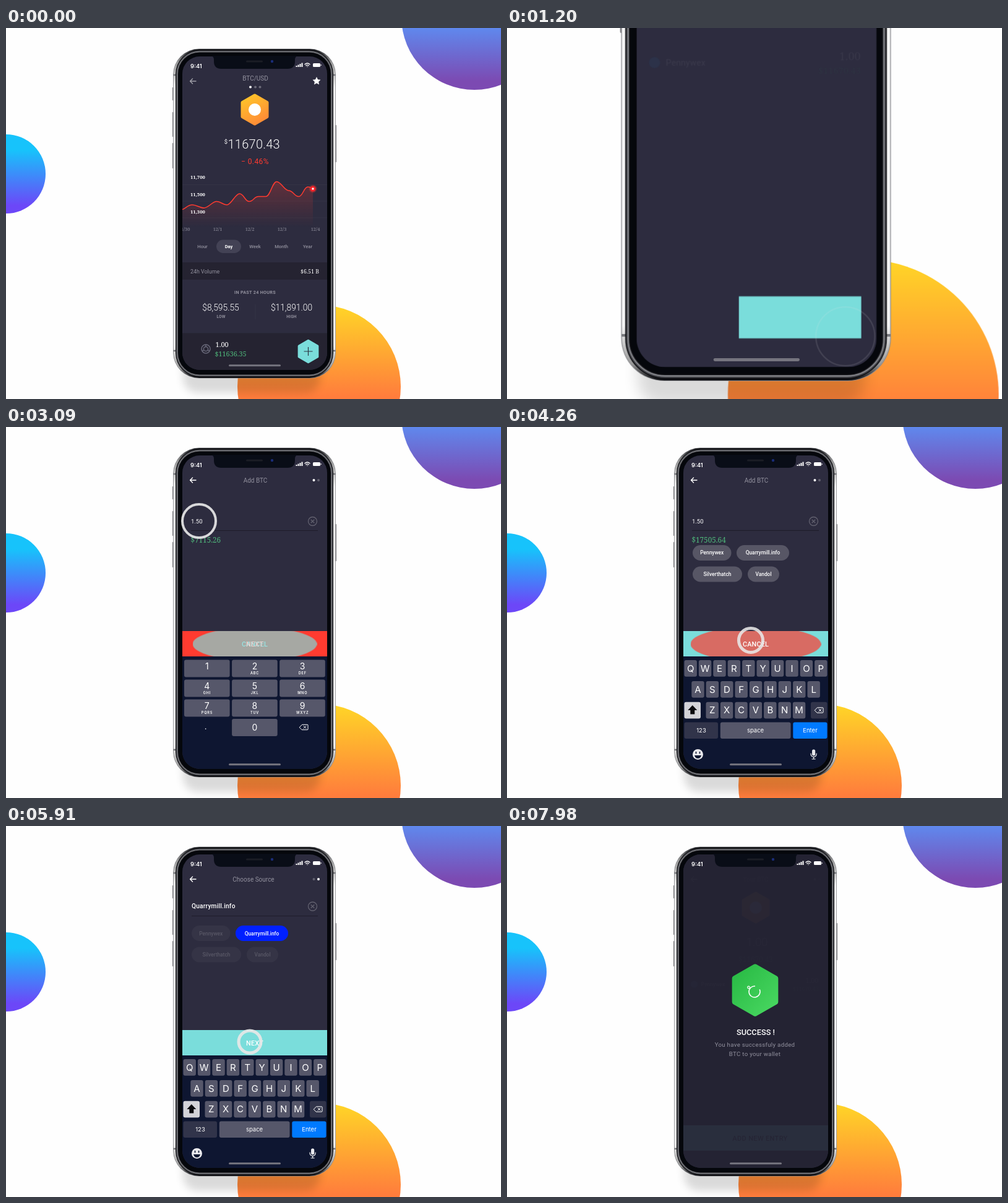
An HTML page that plays this animation: 800 px wide and 600 px high, repeating every 8 s.

```html
<!DOCTYPE html>
<html lang="en">
<head>
<meta charset="utf-8">
<title>Wallet app</title>
<style>
html, body { margin: 0; width: 100%; height: 100%; overflow: hidden; background: #fefefe; }
svg { display: block; width: 100%; height: 100%; }
text { font-family: Roboto, sans-serif; fill: #fff; }
.slab { font-family: "Noto Serif", serif; }
.mid { text-anchor: middle; }
.end { text-anchor: end; }
.thin { font-weight: 300; }
.med { font-weight: 500; }
.bold { font-weight: 700; }
.dim { fill: #92919e; }
.green { fill: #4fb97b; }
.key { font-family: Inter, sans-serif; text-anchor: middle; }
.line { fill: none; stroke: #fff; stroke-width: 1.4; stroke-linecap: round; stroke-linejoin: round; }

.a { animation: 8s ease-in-out infinite both; }
#camera { transform-origin: 400px 560px; animation-name: camera; animation-timing-function: cubic-bezier(.5, 0, .2, 1); }
#home { animation-name: home; }
#plus { animation-name: plus; }
#coin { animation-name: coin; }
#wallet { animation-name: wallet; }
#add { animation-name: add; }
#src { animation-name: src; }
#head { animation-name: head; }
#field { animation-name: field; }
#chips { animation-name: chips; }
#picked { animation-name: picked; }
.off { animation-name: off; }
.on { animation-name: on; }
#bar { transform-origin: 488.5px 351px; animation-name: bar; }
#fill { animation-name: fill; }
#pulse { transform-origin: 402px 351px; animation-name: pulse; animation-timing-function: linear; }
#lblAdd { animation-name: lblAdd; }
#lblCancel { animation-name: lblCancel; }
#lblNext { animation-name: lblNext; }
#keys { animation-name: keys; }
#qwerty { animation-name: qwerty; }
#veil { animation-name: veil; }
#badge { transform-origin: 401px 265.5px; animation-name: badge; }
#done { animation-name: done; }
#spin { stroke-dasharray: 100 110; animation-name: spin; }
#dot { animation-name: dot; }
.tap { fill: none; stroke: #e8e8e8; animation-name: tap; }

@keyframes camera { 0%, 1.875% { transform: scale(1) } 10%, 11.75% { transform: scale(1.975) } 21.69%, 100% { transform: scale(1) } }
@keyframes home { 0%, 12% { opacity: 1 } 15%, 100% { opacity: 0 } }
@keyframes plus { 0%, 12.5% { opacity: 1 } 13.2%, 100% { opacity: 0 } }
@keyframes coin { 0%, 23.5% { opacity: 1 } 26.3%, 75.6% { opacity: 0 } 78.8%, 100% { opacity: .45 } }
@keyframes wallet { 0%, 14.4% { opacity: 0 } 18%, 23.5% { opacity: 1 } 26.3%, 75.6% { opacity: 0 } 78.8%, 100% { opacity: .25 } }
@keyframes add { 0%, 24.5% { opacity: 0; transform: translateY(30px) } 29%, 53.6% { opacity: 1; transform: none } 56.2%, 100% { opacity: 0; transform: none } }
@keyframes src { 0%, 50.8% { opacity: 0 } 52.8%, 74.4% { opacity: 1 } 76.9%, 100% { opacity: 0 } }
@keyframes head { 0%, 53.6% { opacity: 0 } 56.2%, 100% { opacity: 1 } }
@keyframes field { 0%, 52.4% { opacity: 0; transform: translateY(22px) } 57.5%, 100% { opacity: 1; transform: none } }
@keyframes chips { 0%, 50.8% { transform: translateY(52px) } 53.25% { transform: translateY(30px) } 57.5%, 100% { transform: none } }
@keyframes picked { 0%, 61.9% { opacity: 0 } 65%, 100% { opacity: 1 } }
@keyframes off { 0%, 61.9% { opacity: 1 } 64.5%, 100% { opacity: .2 } }
@keyframes on { 0%, 61.9% { fill: #575665 } 64.5%, 100% { fill: #0020ff } }
@keyframes bar {
  0%, 12.5% { opacity: 0; transform: translateY(154px) scaleX(.14) }
  12.9% { opacity: 1; transform: translateY(154px) scaleX(.14) }
  17.5%, 23.5% { opacity: 1; transform: translateY(154px) scaleX(1) }
  30%, 74.6% { opacity: 1; transform: translateY(0) scaleX(1) }
  79.4%, 100% { opacity: 1; transform: translateY(154px) scaleX(1) }
}
@keyframes fill {
  0%, 23.5% { fill: #7adddb } 28.75%, 39.86% { fill: #ff3b30 } 39.875%, 54.36% { fill: #7adddb }
  54.375%, 65.61% { fill: #ff3b30 } 65.625%, 100% { fill: #7adddb }
}
@keyframes pulse {
  0%, 36.125% { transform: scale(0); fill: #ff3b30 } 39.875% { transform: scale(1); fill: #7adddb }
  39.9%, 50.625% { transform: scale(0); fill: #7adddb } 54.375% { transform: scale(1); fill: #ff3b30 }
  54.4%, 61.875% { transform: scale(0); fill: #ff3b30 } 65.625% { transform: scale(1); fill: #7adddb }
  65.65%, 100% { transform: scale(0); fill: #7adddb }
}
@keyframes lblAdd { 0%, 16.2% { opacity: 0 } 18.1%, 23.5% { opacity: 1 } 25.6%, 76.9% { opacity: 0 } 79.4%, 100% { opacity: 1 } }
@keyframes lblCancel {
  0%, 26.9% { opacity: 0; fill: #fff } 29.4%, 36.1% { opacity: 1; fill: #fff }
  39.86% { opacity: 1; fill: #7adddb } 39.9%, 50.6% { opacity: 0; fill: #fff }
  53%, 61.9% { opacity: 1; fill: #fff } 65.6%, 100% { opacity: 0; fill: #fff }
}
@keyframes lblNext {
  0%, 36.1% { opacity: 0; fill: #ff3b30 } 39.875%, 50.6% { opacity: 1; fill: #fff }
  52.6%, 61.9% { opacity: 0; fill: #fff } 65.6%, 74.6% { opacity: 1; fill: #fff } 76.3%, 100% { opacity: 0; fill: #fff }
}
@keyframes keys { 0%, 23.5% { transform: translateY(184px) } 30%, 74.6% { transform: none } 79.4%, 100% { transform: translateY(184px) } }
@keyframes qwerty { 0%, 50.3% { opacity: 0 } 52.5%, 100% { opacity: 1 } }
@keyframes veil { 0%, 75% { opacity: 0 } 80.4%, 100% { opacity: .94 } }
@keyframes badge { 0%, 80.6% { transform: scale(0) } 84.2% { transform: scale(1.03) } 86%, 100% { transform: scale(1) } }
@keyframes done { 0%, 83.5% { opacity: 0; transform: translateY(4px) } 89.5%, 100% { opacity: 1; transform: none } }
@keyframes spin { 0%, 91.1% { stroke-dashoffset: 105 } 99.75%, 100% { stroke-dashoffset: 0 } }
@keyframes dot { 0%, 91% { opacity: 0 } 92.5%, 100% { opacity: 1 } }
@keyframes tap {
  0% { r: 31px; stroke-width: 1px; opacity: 0 }
  .4% { r: 30px; stroke-width: 1px; opacity: .35 }
  3% { r: var(--r, 18px); stroke-width: var(--w, 5px); opacity: .92 }
  4.5% { r: calc(var(--r, 18px) + 1.5px); stroke-width: var(--w, 5px); opacity: .88 }
  7.5%, 100% { r: 30px; stroke-width: 1px; opacity: 0 }
}
</style>
</head>
<body>
<svg viewBox="0 0 800 600" preserveAspectRatio="none">
<defs>
  <linearGradient id="blue" x2="0" y2="1"><stop offset=".56" stop-color="#5e8bf0"/><stop offset=".94" stop-color="#7c4ab2"/></linearGradient>
  <linearGradient id="cyan" x2="0" y2="1"><stop offset=".2" stop-color="#17c3fb"/><stop offset=".9" stop-color="#6c47f8"/></linearGradient>
  <linearGradient id="orange" x2="0" y2="1"><stop stop-color="#ffd627"/><stop offset=".56" stop-color="#ff7d3c"/></linearGradient>
  <linearGradient id="gold" x2=".5" y2="1"><stop stop-color="#ffc928"/><stop offset="1" stop-color="#ff8f36"/></linearGradient>
  <linearGradient id="leaf" x2="1" y2="1"><stop stop-color="#28b944"/><stop offset="1" stop-color="#49d861"/></linearGradient>
  <linearGradient id="steel" x2="0" y2="1"><stop stop-color="#15161a"/><stop offset=".04" stop-color="#999"/><stop offset=".12" stop-color="#f6f6f6"/><stop offset=".9" stop-color="#f6f6f6"/><stop offset=".97" stop-color="#999"/><stop offset="1" stop-color="#08090d"/></linearGradient>
  <linearGradient id="area" x2="0" y2="1"><stop stop-color="#ff3b30" stop-opacity=".25"/><stop offset="1" stop-color="#ff3b30" stop-opacity="0"/></linearGradient>
  <filter id="soft" x="-20%" y="-50%" width="140%" height="200%"><feGaussianBlur stdDeviation="7"/></filter>
  <clipPath id="screen"><rect x="285" y="46" width="234" height="507" rx="28"/></clipPath>
  <clipPath id="barBox"><rect x="285" y="330" width="234" height="41"/></clipPath>
  <path id="hex" d="M0-23L20-11.5V11.5L0 23L-20 11.5V-11.5Z" stroke-width="5" stroke-linejoin="round"/>
  <path id="back" class="line" d="M307 86H297.5M301.5 82l-4 4 4 4"/>
  <g id="pages"><circle cx="497.5" cy="86" r="2" fill="#fff"/><circle cx="505" cy="86" r="2" fill="#62616f"/></g>
  <g id="clear" fill="none" stroke="#62616f" stroke-width="1.3"><circle r="7"/><path d="M-2.8-2.8L2.8 2.8M2.8-2.8L-2.8 2.8"/></g>
  <path id="erase" class="line" style="stroke-width:1" d="M-6.5 0l4-4.2h8.5q1 0 1 1v6.4q0 1-1 1h-8.5zM0-2l4 4M4-2l-4 4"/>
</defs>

<rect width="800" height="600" fill="#fefefe"/>
<g id="camera" class="a">
  <circle cx="757" cy="-18" r="118" fill="url(#blue)"/>
  <circle cy="236" r="64" fill="url(#cyan)"/>
  <circle cx="506" cy="580" r="132" fill="url(#orange)"/>
  <rect x="286" y="520" width="222" height="70" rx="24" opacity=".14" filter="url(#soft)"/>

  <path d="M270.3 97v19M270.3 137v38M270.3 187v39M532.7 158v58" stroke="#77777b" stroke-width="2.6" stroke-linecap="round"/>
  <rect x="270" y="33.5" width="263" height="533" rx="42" fill="#8a8b8f"/>
  <rect x="270.8" y="34" width="261.4" height="532" rx="41.5" fill="url(#steel)"/>
  <path d="M270.5 76h4M270.5 522h4M528.5 76h4M528.5 522h4" stroke="#77787c" stroke-width="2.5"/>
  <rect x="274" y="35.5" width="255" height="529" rx="39" fill="#08090d"/>
  <rect x="276.5" y="38" width="250" height="524" rx="36.5" fill="none" stroke="#45464b" stroke-width="3"/>
  <rect x="276.8" y="38.3" width="249.400" height="523.4" rx="36" fill="none" stroke="#8d8e93"/>
  <rect x="279.5" y="41" width="244" height="518" rx="33" fill="#05070c"/>

  <g clip-path="url(#screen)">
    <rect x="285" y="46" width="234" height="507" fill="#2d2c3f"/>

    <g id="home" class="a">
      <use href="#back" opacity=".55"/>
      <text class="mid dim" x="403" y="84.5" font-size="10">BTC/USD</text>
      <circle cx="395" cy="95.5" r="2" fill="#fff"/>
      <circle cx="403" cy="95.5" r="2" fill="#6c6b79"/><circle cx="410.5" cy="95.5" r="2" fill="#6c6b79"/>
      <path d="M502 79l2 4.2 4.5.6-3.3 3.1.8 4.5-4-2.2-4 2.2.8-4.5-3.3-3.1 4.5-.6z" fill="#fff"/>
      <text class="end" x="358" y="187" font-size="9.5">$</text>
      <text class="thin" x="358.5" y="194.5" font-size="20" letter-spacing=".25">11670.43</text>
      <text class="mid" x="402.5" y="220" font-size="12" letter-spacing=".4" style="fill:#ff3b30">− 0.46%</text>
      <path d="M285 253.5h234M285 280h234M285 307h234" stroke="#fff" stroke-opacity=".035"/>
      <path id="under" fill="url(#area)"/>
      <path id="curve" fill="none" stroke="#ff3b30" stroke-width="1.5"/>
      <circle cx="496" cy="260" r="6.5" fill="#ff3b30" opacity=".3"/><circle cx="496" cy="260" r="4.5" fill="#f5232a"/>
      <circle cx="496" cy="260" r="1.7" fill="#fff"/>
      <g id="scale" font-weight="600"></g>
      <g id="days"></g>
      <rect x="340" y="342.5" width="40" height="21.5" rx="10.7" fill="#434255"/>
      <g id="tabs"></g>
      <rect x="285" y="379" width="234" height="28" fill="#252331"/>
      <text class="dim" x="298" y="397" font-size="8.9">24h Volume</text>
      <text class="slab end" x="506" y="397" font-size="8.8" font-weight="500">$6.51 B</text>
      <text class="mid bold dim" x="402.5" y="430" font-size="7.2" letter-spacing=".3">IN PAST 24 HOURS</text>
      <g class="mid thin" font-size="13.8"><text x="347" y="457">$8,595.55</text><text x="461.5" y="457">$11,891.00</text></g>
      <g class="mid bold" font-size="6.5" letter-spacing=".2"><text class="dim" x="347.5" y="469">LOW</text><text class="dim" x="461.5" y="469">HIGH</text></g>
      <path d="M403 447v24" stroke="#353446"/>
      <rect x="285" y="493.5" width="234" height="60" fill="#252331"/>
      <g fill="none" stroke="#686879" stroke-width="1.5"><circle cx="323" cy="519" r="7"/><circle cx="323" cy="519" r="3.6"/><path d="M323 512v3.4M317 522.5l3-1.7M329 522.5l-3-1.7"/></g>
      <text class="slab" x="338.5" y="516" font-size="11">1.00</text>
      <text class="slab green" x="337.5" y="531" font-size="10.8">$11636.35</text>
    </g>
    <g id="plus" class="a">
      <use href="#hex" fill="#7adddb" stroke="#7adddb" transform="translate(488.5 523) scale(.75)"/>
      <path d="M481.5 523h14M488.5 516v14" stroke="#2c3440" stroke-width="1.2"/>
    </g>

    <g id="coin" class="a">
      <use href="#hex" fill="url(#gold)" stroke="url(#gold)" transform="translate(402 132)"/>
      <circle cx="402" cy="132" r="10" fill="#fff"/>
    </g>

    <g id="wallet" class="a">
      <use href="#back"/><use href="#pages"/>
      <text class="mid dim" x="402" y="89.5" font-size="10">Your BTC</text>
      <text class="mid thin" x="404" y="193.5" font-size="18">1.00</text>
      <text class="slab mid green" x="402" y="219.5" font-size="11.8">$11670.43</text>
      <circle cx="302.5" cy="256" r="5.5" fill="#27a9f5"/>
      <text class="med" x="313.5" y="259" font-size="8.5">Pennywex</text>
      <text class="slab end" x="503.5" y="253.5" font-size="11">1.00</text>
      <text class="slab end green" x="503.5" y="267" font-size="8.8">$11670.43</text>
      <path d="M285 281h234" stroke="#fff" stroke-opacity=".06"/>
    </g>

    <g id="add" class="a">
      <use href="#back"/><use href="#pages"/>
      <text class="mid dim" x="403" y="89.5" font-size="10">Add BTC</text>
      <text id="amount" x="299" y="156" font-size="9.5"></text>
      <use href="#clear" x="495.5" y="152.5"/>
      <path d="M299 167.5h205" stroke="#1e1c2a"/>
      <text id="value" class="slab green" x="298.5" y="187" font-size="11.7"></text>
    </g>

    <g id="src" class="a">
      <g id="head" class="a">
        <use href="#back"/>
        <circle cx="497.5" cy="86" r="2" fill="#62616f"/><circle cx="505" cy="86" r="2" fill="#fff"/>
        <text class="mid dim" x="400" y="89.5" font-size="10">Choose Source</text>
      </g>
      <g id="field" class="a">
        <use href="#clear" x="495.5" y="130"/>
        <path d="M300 145.5h204" stroke="#1e1c2a"/>
        <text id="picked" class="a med" x="300" y="133" font-size="10.2" letter-spacing=".2">Quarrymill.info</text>
      </g>
      <g id="chips" class="a"></g>
    </g>

    <g id="keys" class="a">
      <g id="numpad"><rect x="285" y="371" width="234" height="182" fill="#0e1631"/></g>
      <g id="qwerty" class="a"><rect x="285" y="371" width="234" height="182" fill="#0e1631"/></g>
    </g>
    <g id="bar" class="a">
      <rect id="fill" class="a" x="285" y="330" width="234" height="41"/>
      <g clip-path="url(#barBox)"><ellipse id="pulse" class="a" cx="402" cy="351" rx="150" ry="40"/></g>
      <g class="mid med">
        <text id="lblAdd" class="a" x="409" y="355" font-size="11" letter-spacing=".35" style="fill:#2c3b49">ADD NEW ENTRY</text>
        <text id="lblCancel" class="a" x="402" y="355" font-size="10.8" letter-spacing=".2">CANCEL</text>
        <text id="lblNext" class="a" x="402" y="355" font-size="10.8" letter-spacing=".2">NEXT</text>
      </g>
    </g>

    <rect id="veil" class="a" x="285" y="46" width="234" height="507" fill="#252433"/>
    <g id="badge" class="a">
      <use href="#hex" fill="url(#leaf)" stroke="url(#leaf)" transform="translate(401 265.5) scale(1.66)"/>
      <path id="spin" class="a" d="M401 259A9 9 0 1 0 408.2 264.2" pathLength="100" fill="none" stroke="#fff" stroke-width="1.5"/>
      <circle id="dot" class="a" cx="390.5" cy="261" r="1.8" fill="none" stroke="#fff" stroke-width="1.2"/>
    </g>
    <g id="done" class="a mid">
      <text class="med" x="402" y="338" font-size="12.8">SUCCESS !</text>
      <text class="dim" x="400.5" y="356.5" font-size="9.7" letter-spacing=".3">You have successfuly added</text>
      <text class="dim" x="400.5" y="371.5" font-size="9.7" letter-spacing=".3">BTC to your wallet</text>
    </g>
  </g>

  <path d="M331 45h141q-5 1-5 6v3q0 12-12 12H348q-12 0-12-12v-3q0-5-5-6z" fill="#090d17"/>
  <rect x="388" y="52.5" width="27" height="3" rx="1.5" fill="#1b1d25"/><circle cx="430" cy="54" r="2.2" fill="#1a2d78"/>
  <text x="298" y="64.5" font-size="9.3" font-weight="600" style="font-family:Inter,sans-serif">9:41</text>
  <path d="M469.5 63v-2M472.5 63v-3.500M475.5 63v-5M478.5 63v-6.500" stroke="#fff" stroke-width="2"/>
  <path class="line" d="M483 58.7q4-3.5 8 0M484.8 60.8q2.2-1.8 4.4 0M487 62.5v.1"/>
  <rect x="496" y="57" width="12" height="6" rx="1.5" fill="#fff"/><path d="M509.2 59v2" stroke="#fff"/>
  <rect x="360" y="544.3" width="84" height="3" rx="1.5" fill="#76757f"/>
  <g id="taps"></g>
</g>
</svg>
<script>
const $ = id => document.getElementById(id);
const put = (id, html) => $(id).insertAdjacentHTML('beforeend', html);
const box = (x, y, w, h, fill = '#56576a', r = 3) => `<rect x="${x}" y="${y}" width="${w}" height="${h}" rx="${r}" fill="${fill}"/>`;
const label = (x, y, s, size, cls = 'key', more = '') => `<text class="${cls}" x="${x}" y="${y}" font-size="${size}" ${more}>${s}</text>`;

// Price chart: each point is approached with a level tangent.
const peaks = [[301, 286], [320, 291], [340.5, 280.5], [357, 286], [377.5, 268], [393, 280.5], [408, 272.5], [420, 272.5], [437.5, 248.5], [457, 263], [473, 272.5], [488, 257], [496, 259.5]];
const curve = 'M285 293.5C290 292 294 286 301 286' + peaks.slice(1).map(([x, y]) => `S${x - 7} ${y} ${x} ${y}`).join('');
$('curve').setAttribute('d', curve);
$('under').setAttribute('d', curve + 'V322H285Z');

['11,700', '11,500', '11,300'].forEach((s, i) => put('scale', label(298, 243.5 + 28.2 * i, s, 7.7, 'slab')));
put('days', label(297.5, 328, '11/30', 7.5, 'slab end dim'));
[342, 394, 446, 500].forEach((x, i) => put('days', label(x, 328, '12/' + (i + 1), 7.5, 'slab mid dim')));
['Hour', 'Day', 'Week', 'Month', 'Year'].forEach((s, i) =>
  put('tabs', label(317.5 + 42.5 * i, 355.7, s, 7.5, 'mid ' + (s == 'Day' ? 'bold' : 'med dim'))));

const chip = (x, y, w, s, on) => {
  const pill = `<rect class="${on ? 'a on' : ''}" x="${x}" y="${y}" width="${w}" height="25" rx="12.5" fill="#575665"/>`;
  put('chips', `<g class="${on ? '' : 'a off'}">${pill}${label(x + w / 2, y + 15.5, s, 8.4, 'mid med')}</g>`);
};
chip(300, 161, 62.5, 'Pennywex');
chip(371, 161, 85, 'Quarrymill.info', true);
chip(300, 195.5, 80, 'Silverthatch');
chip(389, 195.5, 51, 'Vandol');

['', 'ABC', 'DEF', 'GHI', 'JKL', 'MNO', 'PQRS', 'TUV', 'WXYZ'].forEach((s, i) => {
  const x = 288 + 77.1 * (i % 3), y = 376.5 + 32 * (i / 3 | 0);
  put('numpad', box(x, y, 73.6, 28) + label(x + 36.8, y + 15, i + 1, 14) + label(x + 37, y + 23.3, s, 5.6, 'key', 'font-weight="600" letter-spacing=".8"'));
});
put('numpad', box(365.1, 472, 73.6, 28) + label(402, 491, 0, 14) + label(322.5, 489, '.', 13) + '<use href="#erase" x="481" y="485.5"/>');

[['QWERTYUIOP', 286.5, 377], ['ASDFGHJKL', 298.3, 411], ['ZXCVBNM', 321.5, 444.7]].forEach(([row, x0, y]) =>
  [...row].forEach((s, i) => {
    const x = x0 + 23.4 * i;
    put('qwerty', box(x, y, 20.4, 26.7) + label(x + 10.2, y + 18.6, s, 15));
  }));
put('qwerty', box(286.5, 444.7, 26.5, 26.7, '#d3d3d8') + '<path d="M299.8 450l7.5 8h-4v6.5h-7v-6.5h-4z" fill="#0a0a0e"/>'
  + box(491, 444.7, 26.5, 26.7, '#31344a') + '<use href="#erase" x="504" y="458"/>'
  + box(286.5, 477.5, 54.5, 26.5, '#31344a') + label(314, 494, '123', 9.5)
  + box(344.8, 477.5, 113.7, 26.5) + label(401.5, 494, 'space', 9.5)
  + box(462.3, 477.5, 55.2, 26.5, '#007aff') + label(490, 494, 'Enter', 9.5)
  + '<circle cx="308.5" cy="529.5" r="8.5" fill="#e9e9ed"/><path d="M305.5 525v3.5M311.5 525v3.5" stroke="#0e1631" stroke-width="1.6"/>'
  + '<path d="M303 531h11q-1 5-5.5 5t-5.5-5z" fill="#0e1631"/>'
  + box(493, 521.5, 5.2, 10, '#e9e9ed', 2.6) + '<path class="line" style="stroke-width:1.1" d="M491 528q0 5.5 4.6 5.5t4.6-5.5M495.6 533.5v3.5M493 537h5.2"/>');

// Touches: x, y, start in ms.
[[488.5, 523, 660], [394, 499.5, 1615], [312, 152, 2850, '--r:27px;--w:4px'], [394, 345, 3900], [413, 174, 4700], [394, 349, 5670]]
  .forEach(([x, y, at, size = '']) => put('taps', `<circle class="a tap" cx="${x}" cy="${y}" style="animation-delay:${at}ms;${size}"/>`));

let start;
function tick(now) {
  start ??= now;
  const t = (now - start) % 8000;
  const typed = Math.max(0, Math.min(4, Math.floor((t - 2330) / 120)));
  const rise = Math.max(0, Math.min(1, (t - 2884.74) / 505));
  $('amount').textContent = '1.50'.slice(0, typed);
  $('value').textContent = '$' + (17505.64 * rise).toFixed(2);
  requestAnimationFrame(tick);
}
requestAnimationFrame(tick);
</script>
</body>
</html>
```
